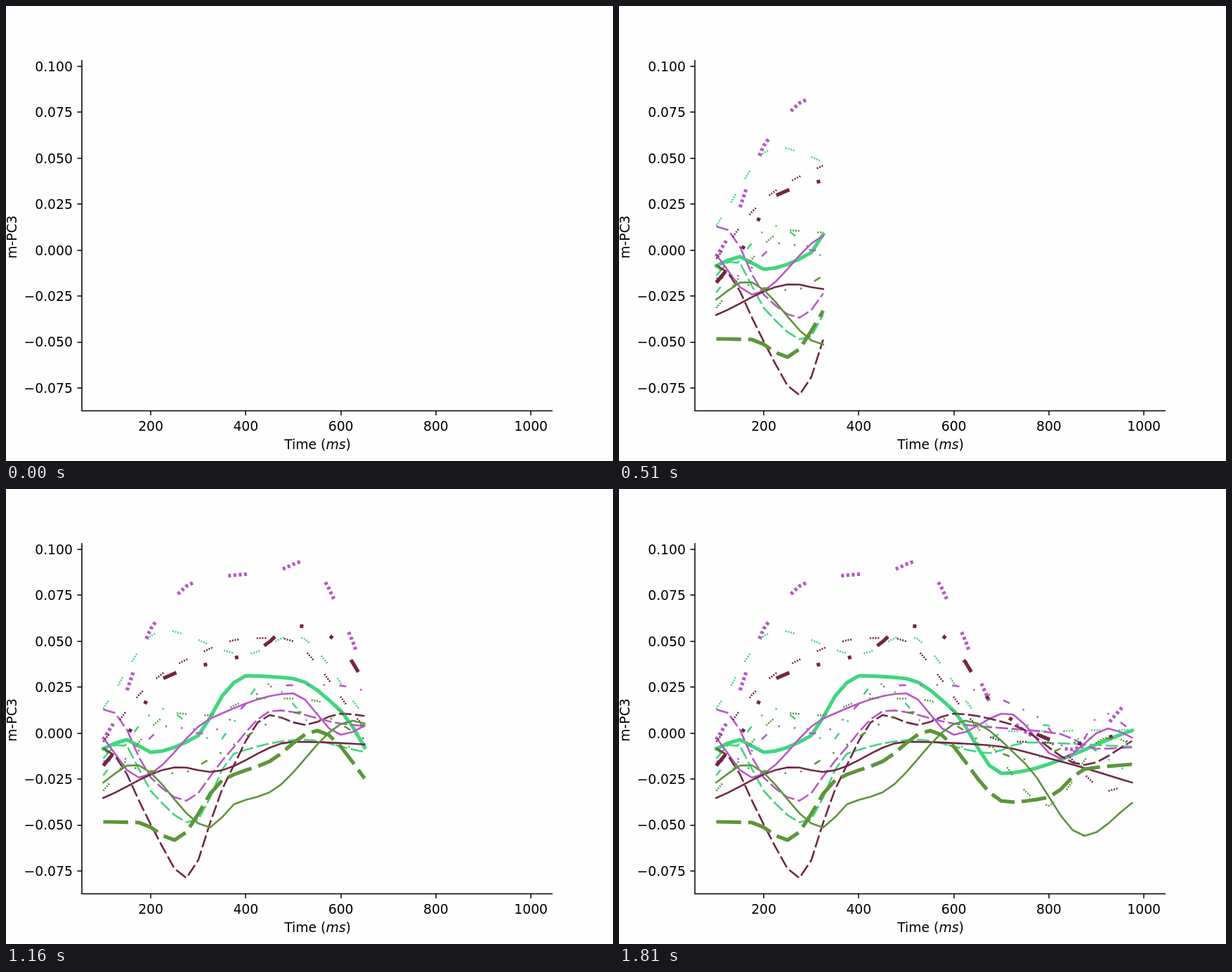
An HTML page that plays this animation: 864 by 648 pixels, repeating every 1860 ms.

```html
<!DOCTYPE html>
<html lang="en">
<head>
<meta charset="utf-8">
<title>m-PC3 over time</title>
<style>
  html, body { margin: 0; width: 100%; height: 100%; overflow: hidden; background: #fefefe; }
  svg { display: block; width: 864px; height: 648px; font: 18.75px "DejaVu Sans", sans-serif; }
  polyline { fill: none; stroke-linejoin: round; }
  .axis { fill: none; stroke: #000; stroke-width: 1.5; }
</style>
</head>
<body>
<svg id="plot" viewBox="0 0 864 648">
  <path class="axis" d="M108 77V576.5H778"/>
  <text x="443.5" y="631" text-anchor="middle">Time (<tspan font-style="oblique">ms</tspan>)</text>
  <text transform="translate(15 329) rotate(-90)" text-anchor="middle">m-PC3</text>
</svg>
<script>
const plot = document.getElementById('plot');

function add(tag, attrs, text = '') {
  const el = document.createElementNS('http://www.w3.org/2000/svg', tag);
  for (const key in attrs) el.setAttribute(key, attrs[key]);
  el.textContent = text;
  return plot.appendChild(el);
}

const xOf = ms => 138.44 + (ms - 100) * 0.67636;

for (let ms = 200; ms <= 1000; ms += 200) {
  const x = Math.round(xOf(ms));
  add('path', { class: 'axis', d: `M${x} 576.5v6.6` });
  add('text', { x: xOf(ms), y: 604.7, 'text-anchor': 'middle' }, ms);
}
for (let k = -3; k <= 4; k++) {
  const y = 347.7 - k * 65.45;
  add('path', { class: 'axis', d: `M108 ${Math.round(y)}h-6.6` });
  add('text', { x: 94.9, y: y + 6.8, 'text-anchor': 'end' },
    (k < 0 ? '\u2212' : '') + Math.abs(k * 0.025).toFixed(3));
}

// Smooth curve through [step, height] keys that is level at every turning point.
function curve(keys) {
  const slopes = keys.slice(1).map(([s, y], k) => (y - keys[k][1]) / (s - keys[k][0]));
  const tangents = keys.map((_, k) => {
    const a = slopes[k - 1] ?? slopes[k], b = slopes[k] ?? a;
    return a * b > 0 ? 2 * a * b / (a + b) : 0;
  });
  return step => {
    const k = Math.max(1, keys.findIndex(([s]) => s >= step));
    const [s0, y0] = keys[k - 1], [s1, y1] = keys[k];
    const span = s1 - s0, u = (step - s0) / span, v = 1 - u;
    return y0 * v * v * (1 + 2 * u) + y1 * u * u * (1 + 2 * v)
      + span * u * v * (tangents[k - 1] * v - tangents[k] * u);
  };
}

const mint = '#41d67e', purple = '#b857c9', maroon = '#732643', olive = '#5c953a';
const thin = 2.6, thick = 5.2;
// Dash lengths count in units that grow with the line width.
const solid = [], dashed = [7, 2], dashDots = [4, 8, 1, 8, 1, 8];
const dotted = [.8, .7, .8, .7, .8, .7, .8, 10.2];
const steps = 36;
const traces = [];

function trace(color, width, dash, ...keys) {
  const line = add('polyline', {
    stroke: color,
    'stroke-width': width,
    'stroke-linecap': dash.length ? 'butt' : 'square',
    'stroke-dasharray': dash.map(d => d * width * 0.973).join(' ') || 'none'
  });
  const heightAt = curve(keys);
  const points = Array.from({ length: steps }, (_, i) =>
    `${xOf(100 + 25 * i).toFixed(2)},${heightAt(i).toFixed(2)}`);
  traces.push({ line, points });
}

trace(mint, thick, solid, [0, 370], [2, 357], [4, 375], [8, 351], [10, 295], [12, 266], [16, 270], [20, 316], [24, 405], [35, 344]);
trace(mint, thin, dashed, [0, 384], [1.5, 360], [4, 430], [7.5, 476], [11, 377], [17, 357], [23, 376], [26, 361], [35, 367]);
trace(mint, thin, dashDots, [0, 408], [5, 313], [9.5, 359], [13.5, 276], [20, 368], [27, 335], [35, 406]);
trace(mint, thin, dotted, [0, 313], [5, 201], [12, 236], [16, 208], [24, 345], [35, 343]);

trace(purple, thin, solid, [0, 354], [3, 411], [9, 327], [16, 291], [20, 350], [24.5, 319], [29, 384], [33, 341], [35, 354]);
trace(purple, thin, dashed, [0, 314], [1, 319], [4, 411], [7, 444], [10, 387], [14.5, 315], [20, 334], [29, 349], [32, 370], [35, 368]);
trace(purple, thin, dashDots, [0, 388], [2, 384], [5.5, 336], [8.5, 349], [14.5, 280], [19, 279], [27, 324], [30, 376], [32.5, 318], [35, 345]);
trace(purple, thick, dotted, [0, 357], [1, 330], [4, 199], [8, 130], [15, 115], [17, 101], [21, 217], [23, 303], [30, 371], [35, 297]);

trace(maroon, thin, solid, [0, 440], [6.5, 396], [9, 403], [16, 360], [23, 365], [29, 388], [35, 418]);
trace(maroon, thin, dashed, [0, 369], [1, 380], [4, 478], [7, 554], [10, 428], [14, 322], [17, 336], [20, 320], [25, 336], [31, 393], [35, 359]);
trace(maroon, thick, dashDots, [0, 394], [2, 352], [5, 270], [13, 230], [16, 194], [19, 208], [24, 319], [30, 363], [35, 345]);
trace(maroon, thin, dotted, [0, 360], [4, 276], [7, 243], [12, 213], [15, 212], [24, 359], [28, 361], [33, 430], [35, 418]);

trace(olive, thin, solid, [0, 418], [2.5, 392], [9, 482], [11, 449], [14, 432], [21, 330], [26, 391], [31, 494], [35, 447]);
trace(olive, thick, dashed, [0, 474], [3, 475], [6, 500], [10, 415], [14, 388], [18, 344], [24.5, 446], [28, 439], [31, 399], [35, 392]);
trace(olive, thin, dashDots, [0, 370], [2, 395], [6.5, 405], [9, 384], [17, 317], [26, 385], [32, 354], [35, 360]);
trace(olive, thin, dotted, [0, 430], [6, 319], [8.5, 323], [13, 298], [17, 299], [21, 326], [28, 451], [33, 351], [35, 365]);

// An empty plot for 110 ms, then one more segment every 50 ms.
const start = performance.now();
let shown = -1;
function draw() {
  const t = (performance.now() - start) % 1860;
  const count = t < 110 ? 0 : Math.floor((t - 110) / 50) + 2;
  if (count !== shown) {
    shown = count;
    for (const { line, points } of traces) line.setAttribute('points', points.slice(0, count).join(' '));
  }
  requestAnimationFrame(draw);
}
draw();
</script>
</body>
</html>
```
